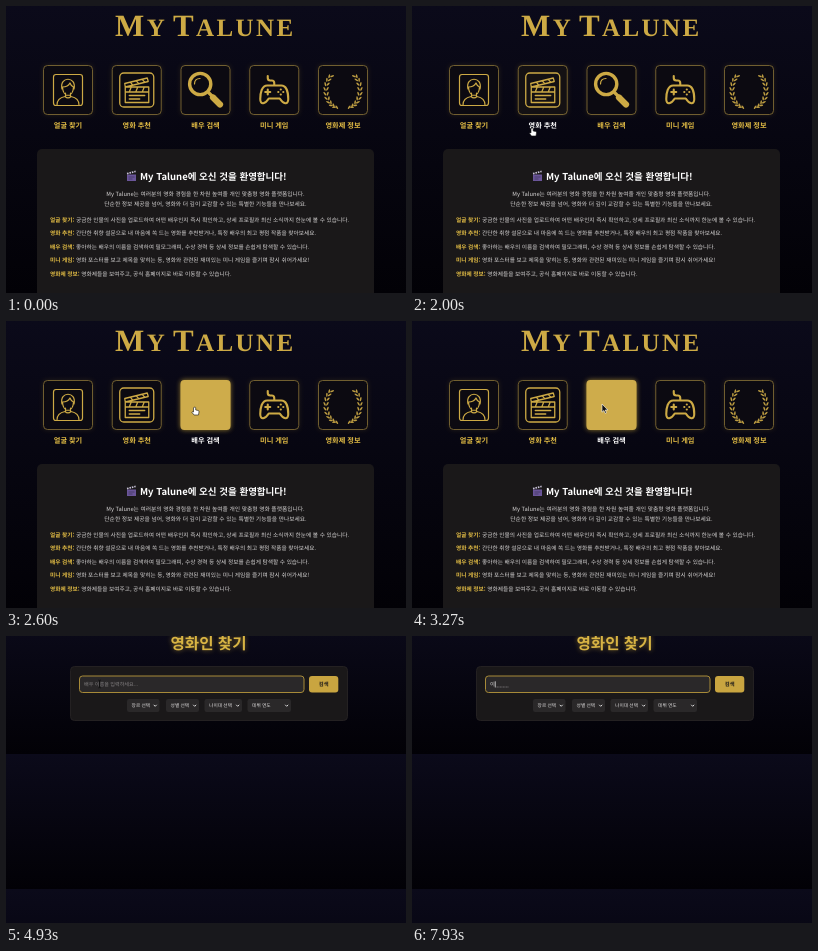
Write an HTML page that moves like this. It is 400x287 px and loops after 8 s.

```html
<!DOCTYPE html>
<html lang="ko">
<head>
<meta charset="utf-8">
<title>My Talune</title>
<style>
html, body { margin: 0; width: 100%; height: 100%; overflow: hidden; background: #05040b; }
svg { display: block; width: 100vw; height: 100vh; }
text { font-family: "Noto Sans CJK KR", "Noto Sans CJK", "Noto Sans CJK JP", "Noto Sans", sans-serif; white-space: pre; text-rendering: geometricPrecision; }
.brand { font-family: "Liberation Serif", "Noto Serif", serif; font-weight: 700; fill: #cdaa45; letter-spacing: 2.4px; }
.bold { font-weight: 700; }
.mid { text-anchor: middle; }
.line { fill: none; stroke: #cdaa45; stroke-linecap: round; stroke-linejoin: round; }
.body { font-size: 5.76px; fill: #d9d7d7; }
.note { font-size: 5.7px; fill: #d9d7d7; }
.gold { fill: #e3bd45; }
</style>
</head>
<body>
<svg viewBox="0 0 400 287" preserveAspectRatio="none">
  <defs>
    <linearGradient id="night" x1="0" y1="0" x2="0" y2="1">
      <stop offset="0" stop-color="#0b0a1a"/><stop offset="1" stop-color="#020106"/>
    </linearGradient>
    <filter id="glow" x="-50%" y="-50%" width="200%" height="200%"><feGaussianBlur stdDeviation="2.6"/></filter>
  </defs>

  <g id="home">
    <rect width="400" height="287" fill="url(#night)"/>
    <text class="brand" x="109" y="30" font-size="31">M<tspan font-size="25">Y</tspan></text>
    <text class="brand" x="167" y="30" font-size="31">T<tspan font-size="25">ALUNE</tspan></text>
    <g id="cards"></g>
    <rect x="31" y="143" width="337" height="160" rx="5" fill="#1a1819"/>
    <g id="clap">
      <path d="M121 168.5h9v6.5h-9z" fill="#6a5599"/>
      <path d="M121 167.6l8.6-2.2" stroke="#c9c3d8" stroke-width="1.7" stroke-dasharray="1.6 .9"/>
      <path d="M122.5 171h6M122.5 173h4" stroke="#3b3158" stroke-width=".7"/>
    </g>
    <text class="bold" x="134" y="174" font-size="9.5" fill="#fff">My Talune에 오신 것을 환영합니다!</text>
    <text class="body mid" x="199.5" y="190.2">My Talune는 여러분의 영화 경험을 한 차원 높여줄 개인 맞춤형 영화 플랫폼입니다.</text>
    <text class="body mid" x="199.5" y="200.2">단순한 정보 제공을 넘어, 영화와 더 깊이 교감할 수 있는 특별한 기능들을 만나보세요.</text>
    <g id="list"></g>
  </g>

  <g id="search">
    <rect y="-17" width="400" height="135" fill="url(#night)"/>
    <rect y="118" width="400" height="135" fill="url(#night)"/>
    <rect y="253" width="400" height="135" fill="url(#night)"/>
    <text class="bold mid" x="202.5" y="13" font-size="15.6" fill="#d4af37" opacity=".6" filter="url(#glow)">영화인 찾기</text>
    <text class="bold mid" x="202.5" y="13" font-size="15.6" fill="#d8b444">영화인 찾기</text>
    <rect x="64.5" y="30.5" width="277" height="54" rx="4" fill="#1a1819" stroke="#242122"/>
    <rect id="field" x="73.5" y="40" width="224.5" height="16.5" rx="3" fill="#2a2829"/>
    <text id="hint" x="78" y="50.3" font-size="5.1" fill="#858283">배우 이름을 입력하세요...</text>
    <g id="typed">
      <text x="78" y="50.4" font-size="5.3" fill="#e4e2e2">이</text>
      <path d="M84.5 51H97" stroke="#858283" stroke-width=".7" stroke-dasharray="2.2 .8"/>
    </g>
    <path id="caret" stroke="#eee" stroke-width=".7"/>
    <rect x="303" y="40" width="29.3" height="16.5" rx="3" fill="#c9a540"/>
    <text class="bold mid" x="317.7" y="50.3" font-size="5.3" fill="#1a1819">검색</text>
    <g id="selects"></g>
  </g>

  <g id="arrow"><path d="M0 0V8.2L1.9 6.5 3.2 9.3 4.5 8.7 3.2 6H5.8Z" fill="#111" stroke="#fff" stroke-width=".6"/></g>
  <g id="hand"><path d="M0 .2C.8-.1 1.2.4 1.2 1V3L3.8 3.5Q4.7 3.8 4.5 4.9L4 8H-.5L-2.6 5.3Q-2.4 4.2-1 5V1Q-1 .3 0 .2Z" fill="#fff" stroke="#111" stroke-width=".6"/></g>
  <g id="beam"><path d="M-1.3-4Q0-4 0-3V3Q0 4-1.3 4M1.3-4Q0-4 0-3V3Q0 4 1.3 4" fill="none" stroke="#111" stroke-width=".7"/></g>
</svg>
<script>
const LOOP = 8000, SWITCH = 3400, FOCUS = 4330, TYPED = 7700;
const $ = id => document.getElementById(id);
const clamp = v => Math.max(0, Math.min(1, v));
const ease = v => { v = clamp(v); return v * v * (3 - 2 * v); };
const show = (id, on) => $(id).setAttribute("display", on ? "inline" : "none");

// One laurel branch; side is -1 or 1.
function branch(side) {
  let out = "";
  for (let i = 0; i < 9; i++) {
    const deg = -50 + i * 15.5, a = deg * Math.PI / 180;
    const y = 18 * Math.sin(a);
    for (const lean of [-1, 1]) {
      const x = side * (4 + 13 * Math.cos(a) + lean * 1.4);
      const tilt = side * (deg * .85 + lean * 28);
      out += `<ellipse rx=".8" ry="2.1" fill="#bd9d42" transform="translate(${x} ${y}) rotate(${tilt})"/>`;
    }
  }
  return out;
}

const icons = [
  `<g class="line" stroke-width="1.2"><rect x="-14.5" y="-15.5" width="29" height="31" rx="2.5"/>
   <path d="M-5.5-3C-5 8 5 8 5.5-3M-6-1C-9-14 9-14 6-1M-5.5-3Q0-3 2-7Q3-4 5.5-3M-11 15Q-11 8-3 6.5Q0 9.5 3 6.5Q11 8 11 15M-2.5 3V6.5M2.5 3V6.5"/></g>`,
  `<g class="line" stroke-width="1.3"><rect x="-17" y="-17" width="34" height="34" rx="4"/>
   <path d="M-11.5-3H12V12.5H-11.5ZM-11.5-3V2H12M-12-6.5L10.5-12 11.5-8.5-11.5-3ZM-6.5-7.8L-4-4.8M-.5-9.2L2-6.3M5.5-10.7L8-7.7M-5.5-3L-7.5 2M1-3L-1 2M7.5-3L5.5 2M-7.5 5.5H8M-7.5 9H3"/></g>`,
  `<g class="line"><circle cx="-5.3" cy="-6" r="10.6" stroke-width="3.4"/><path d="M3 2.5L6 5.5" stroke-width="3.2"/>
   <path d="M7.5 7.5L14.5 14.5" stroke-width="6.2"/><path d="M-11-6Q-11-11.5-5.5-11.5" stroke-width="1.2"/></g>`,
  `<g class="line" stroke-width="2.1"><path d="M-7-4.5H7C12.5-4.5 14 3 14 9C14 15.5 9 14 5.5 8.5H-5.5C-9 14-14 15.5-14 9C-14 3-12.5-4.5-7-4.5ZM0-4.5V-7Q0-9.5-2.5-9.5H-4Q-6.5-9.5-6.5-12V-14M-6.5-.5V4.5M-9 2H-4"/>
   <path d="M6.5-.5H6.6M6.5 4.5H6.6M4 2H4.1M9 2H9.1"/></g>`,
  branch(-1) + branch(1)
];
const names = ["얼굴 찾기", "영화 추천", "배우 검색", "미니 게임", "영화제 정보"];
const notes = [
  "궁금한 인물의 사진을 업로드하여 어떤 배우인지 즉시 확인하고, 상세 프로필과 최신 소식까지 한눈에 볼 수 있습니다.",
  "간단한 취향 설문으로 내 마음에 쏙 드는 영화를 추천받거나, 특정 배우의 최고 평점 작품을 찾아보세요.",
  "좋아하는 배우의 이름을 검색하여 필모그래피, 수상 경력 등 상세 정보를 손쉽게 탐색할 수 있습니다.",
  "영화 포스터를 보고 제목을 맞히는 등, 영화와 관련된 재미있는 미니 게임을 즐기며 잠시 쉬어가세요!",
  "영화제들을 보여주고, 공식 홈페이지로 바로 이동할 수 있습니다."
];

$("cards").innerHTML = names.map((name, i) => `<g transform="translate(${62 + i * 68.75} 84)">
  <rect id="halo${i}" x="-25" y="-25" width="50" height="50" rx="4" fill="#d4af37" filter="url(#glow)"/>
  <rect x="-24.5" y="-24.5" width="49" height="49" rx="4" fill="#0c0a11" stroke="#7c6834" stroke-width=".9"/>
  ${icons[i]}
  <rect id="fill${i}" x="-25" y="-25" width="50" height="50" rx="4" fill="#ceac4b"/>
  <text id="label${i}" class="bold mid" y="37.6" font-size="7.2">${name}</text></g>`).join("");

$("list").innerHTML = notes.map((note, i) =>
  `<text class="note" x="44" y="${215.6 + i * 13.5}"><tspan class="bold gold">${names[i]}:</tspan> ${note}</text>`).join("");

$("selects").innerHTML = [["장르 선택", 121, 32.5], ["성별 선택", 160, 33], ["나이대 선택", 198.5, 37.5], ["데뷔 연도", 241.5, 43.5]]
  .map(([name, x, w]) => `<rect x="${x}" y="63" width="${w}" height="13" rx="2.2" fill="#2a2829"/>
    <text x="${x + 4.6}" y="71.2" font-size="4.7" font-weight="500" fill="#e4e2e2">${name}</text>
    <path d="M${x + w - 5.8} 68.8l1.5 1.5 1.5-1.5" fill="none" stroke="#eee" stroke-width=".9"/>`).join("");

// Pointer stops: time, x, y
const stops = [[1750, 116, 140], [1950, 120, 122], [2080, 120, 122], [2430, 188.5, 86],
  [2600, 188.5, 86], [2900, 190, 83], [3530, 190, 83], [4200, 93.6, 48], [8000, 93.6, 48]];
// Hover spans per card: enter, leave
const hovers = { 1: [1965, 2200], 2: [2260, SWITCH] };

function pointer(t) {
  const i = stops.findIndex((s, k) => k && t <= s[0]);
  const [t0, x0, y0] = stops[i - 1], [t1, x1, y1] = stops[i];
  const p = ease((t - t0) / (t1 - t0));
  return [x0 + (x1 - x0) * p, y0 + (y1 - y0) * p];
}

function draw(t) {
  const home = t < SWITCH;
  show("home", home);
  show("search", !home);

  names.forEach((_, i) => {
    const [enter, leave] = hovers[i] || [LOOP, LOOP];
    const level = ease((Math.min(t, leave) - enter) / 300) * (1 - ease((t - leave) / 300));
    $("fill" + i).setAttribute("opacity", level);
    $("halo" + i).setAttribute("opacity", .13 + .55 * level);
    $("label" + i).setAttribute("fill", t >= enter && t < leave ? "#fff" : "#e3bd45");
  });

  const focused = t >= FOCUS, typed = t >= TYPED;
  $("field").setAttribute("stroke", focused ? "#a78a38" : "#444142");
  show("hint", !typed);
  show("typed", typed);
  show("caret", focused && (t - (typed ? TYPED : FOCUS)) % 1000 < 500);
  $("caret").setAttribute("d", `M${typed ? 83.3 : 78} 45.3v6.2`);

  const visible = t >= stops[0][0] && !typed;
  const [x, y] = pointer(Math.max(t, stops[0][0]));
  const overField = !home && y < 57;
  const overLink = home && t < 2900 && Object.values(hovers).some(([a, b]) => t >= a && t < b);
  const kind = overField ? "beam" : overLink ? "hand" : "arrow";
  for (const id of ["arrow", "hand", "beam"]) {
    show(id, visible && id === kind);
    $(id).setAttribute("transform", `translate(${x} ${y})`);
  }
}

const start = performance.now();
function tick() {
  draw((performance.now() - start) % LOOP);
  requestAnimationFrame(tick);
}
tick();
</script>
</body>
</html>
```
